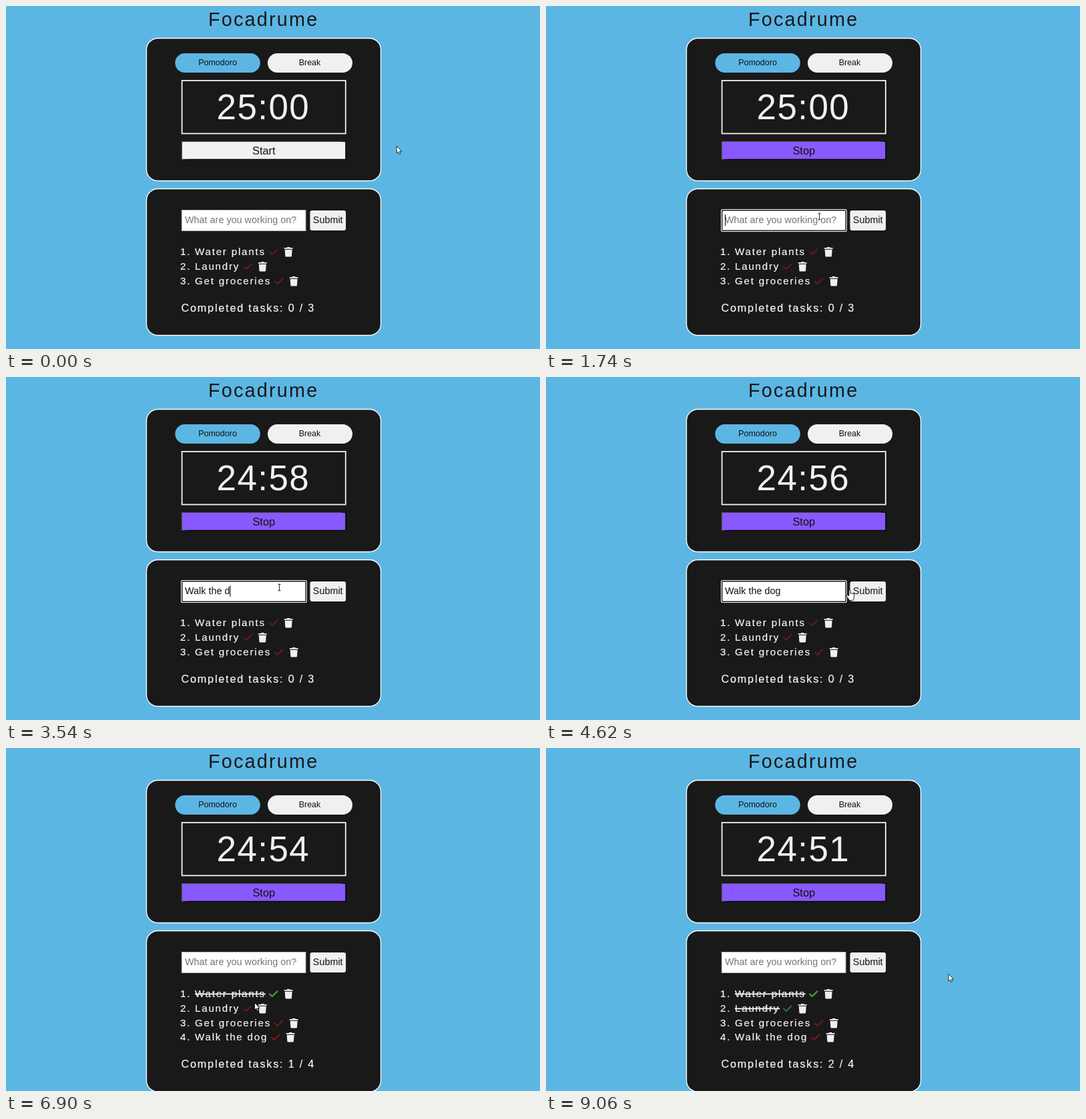
Animation, 800 px wide and 515 px high, one loop 9.3 s. Source, as an HTML page:

```html
<!DOCTYPE html>
<html lang="en">
<head>
<meta charset="utf-8">
<title>Focadrume</title>
<style>
  html, body { margin: 0; width: 100%; height: 100%; overflow: hidden; background: #5cb6e4; }
  svg { display: block; width: 100vw; height: 100vh; font-family: "Liberation Sans", Arial, sans-serif; }
  text { white-space: pre; }
  .mid { text-anchor: middle; fill: #111; }
  .card { fill: #191919; stroke: #fff; stroke-width: 1.3; }
  .light { fill: #f0f0f0; }
  .task, #total { fill: #f8f8f8; stroke: #f8f8f8; stroke-width: .2; letter-spacing: 1.8px; }
  .task { font-size: 15.1px; }
  .field { font-size: 14.4px; }
  .check { fill: none; stroke-width: 2.1; stroke-linecap: round; stroke-linejoin: round; }
  .cursor { fill: #fff; stroke: #000; stroke-width: .8; stroke-linejoin: round; }
</style>
</head>
<body>
<svg viewBox="0 0 800 515">
  <rect width="800" height="515" fill="#5cb6e4"/>
  <text x="303" y="30" font-size="28.8" letter-spacing="2.2" fill="#191919">Focadrume</text>

  <rect class="card" x="210.5" y="48.5" width="351" height="214" rx="17"/>
  <rect x="253.3" y="71" width="127.5" height="29" rx="14.5" fill="#5cb6e4"/>
  <rect class="light" x="392" y="71" width="127" height="29" rx="14.5"/>
  <g class="mid" font-size="12.5">
    <text x="317" y="89">Pomodoro</text>
    <text x="455" y="89">Break</text>
  </g>
  <rect x="263.6" y="112" width="245.2" height="79.5" fill="none" stroke="#f8f2ec" stroke-width="1.8"/>
  <text id="clock" class="light" x="315.5" y="170" font-size="53" letter-spacing="1.4"></text>
  <path d="M262.7 231V203H509.7Z" fill="#4c4c4c"/>
  <path d="M262.7 231H509.7V203Z"/>
  <rect id="toggle" x="264" y="204" width="244.3" height="25.7"/>
  <text id="toggleText" class="mid" x="386.3" y="223" font-size="16.4"></text>

  <rect id="list" class="card" x="210.5" y="274.5" width="351" rx="17"/>
  <rect x="263.3" y="306.5" width="185.7" height="31" fill="#fff" stroke="#bbb"/>
  <g id="focus">
    <rect x="262" y="305" width="188.8" height="34" rx="2.5" fill="#fff"/>
    <rect x="263.7" y="306.7" width="185.4" height="30.6" rx="1" fill="#fff" stroke="#191919" stroke-width="1.4"/>
  </g>
  <text id="field" class="field" x="268" y="326"></text>
  <rect id="caret" y="313" width="1" height="17"/>
  <rect class="light" x="455.5" y="307" width="53.6" height="30" rx="3"/>
  <text class="mid field" x="482.2" y="326">Submit</text>
  <g id="tasks"></g>
  <text id="total" x="262.5" font-size="16.2"></text>

  <g id="cursor">
    <path id="arrow" class="cursor" d="M.3 .3V11.2L2.7 8.9 4.3 12.6 6 11.8 4.5 8.3H7.8Z"/>
    <path id="hand" class="cursor" d="M-1.2 8.8V1a1.1 1.1 0 0 1 2.2 0V5.4a1 1 0 0 1 1.9.2 1 1 0 0 1 1.9.4.9.9 0 0 1 1.7.5V10.5c0 2-1.4 3-1.4 5.2H-.8C-.8 13.8-4.4 11-4.8 8.8c-.2-1 1-1.6 1.9-.8Z"/>
    <path id="beam" d="M-2 -4.8H2M-2 4.8H2M0 -4.8V4.8" fill="none" stroke="#222" stroke-width="1"/>
  </g>
</svg>
<script>
const LOOP = 9300, STEP = 60;
const START = 960, FOCUS = 1740, SUBMIT = 5100, BLINK = 480;
const ENTRY = "Walk the dog";
const keys = [...ENTRY].map((c, i) => i < 10 ? 2700 + i * 93.3 : 3060 + i * 60);

const tasks = [
  { name: "Water plants", icon: 393.8, done: 6360, red: "#601d17", green: "#45a63f" },
  { name: "Laundry", icon: 354.9, done: 7440, red: "#601d17", green: "#2f7030" },
  { name: "Get groceries", icon: 401.8, red: "#6c1c16" },
  { name: ENTRY, icon: 396.8, from: SUBMIT, red: "#841513" }
];

// Each move: begin, end, target point
const home = [585, 210];
const moves = [
  [180, 660, 476, 214],
  [1200, 1740, 409.5, 316],
  [4380, 4740, 471, 321],
  [5400, 6000, 397, 368],
  [6660, 7050, 360, 389],
  [7800, 8460, 602.7, 339]
];

// Areas that show the hand: left, top, right, bottom
const links = [
  [253, 71, 519, 100], [263, 203, 509, 231], [455, 307, 509, 337],
  [394, 363, 408, 376], [355, 384, 369, 397]
];
const input = [263, 306, 450, 338];

const $ = id => document.getElementById(id);
const show = (el, on) => el.setAttribute("visibility", on ? "visible" : "hidden");
const inside = (x, y, [l, t, r, b]) => x >= l && x <= r && y >= t && y <= b;

$("tasks").innerHTML = tasks.map(({ name, icon }, i) => {
  const y = Math.round(374.3 + i * 21.67);
  return `<g>
    <text class="task" x="261" y="${y}">${i + 1}.</text>
    <text class="task" x="283" y="${y}">${name}</text>
    <path class="check" transform="translate(${icon} ${y - 10})" d="M1.2 5.4L4.9 9 12.6 1.4"/>
    <path class="light" transform="translate(${icon + 23} ${y - 12})"
      d="M0 1H3.8L4.4 0H8.4L9 1H12.8V2.8H0ZM.9 3.7H11.9L11.2 13.2Q11.1 14.4 10 14.4H2.8Q1.7 14.4 1.6 13.2Z"/>
  </g>`;
}).join("");
const rows = [...$("tasks").children];

function cursorAt(t) {
  let [x, y] = home;
  for (const [a, b, tx, ty] of moves) {
    const u = Math.min(1, Math.max(0, (t - a) / (b - a)));
    const s = u * u * (3 - 2 * u);
    x += (tx - x) * s;
    y += (ty - y) * s;
  }
  return [x, y];
}

function drawClock(t) {
  const running = t >= START;
  const left = 1500 - (running ? Math.floor((t - START) / 900) : 0);
  $("clock").textContent = `${Math.floor(left / 60)}:${String(left % 60).padStart(2, "0")}`;
  $("toggle").setAttribute("fill", running ? "#8859ff" : "#f0f0f0");
  $("toggleText").textContent = running ? "Stop" : "Start";
}

function drawField(t) {
  const focused = t >= FOCUS && t < SUBMIT;
  const typed = focused ? keys.filter(k => k <= t).length : 0;
  const last = typed ? keys[typed - 1] : FOCUS;
  const field = $("field");
  field.textContent = typed ? ENTRY.slice(0, typed) : "What are you working on?";
  field.setAttribute("fill", typed ? "#111" : "#757575");
  show($("focus"), focused);
  show($("caret"), focused && Math.floor((t - last) / BLINK) % 2 === 0);
  $("caret").setAttribute("x", 268 + (typed ? field.getComputedTextLength() : 0));
}

function drawTasks(t) {
  let count = 0, done = 0;
  tasks.forEach((task, i) => {
    const here = t >= (task.from || 0), ticked = t >= task.done;
    count += here;
    done += ticked;
    show(rows[i], here);
    rows[i].children[1].setAttribute("text-decoration", ticked ? "line-through" : "none");
    rows[i].children[2].setAttribute("stroke", ticked ? task.green : task.red);
  });
  const grow = (count - 3) * 21.67;
  $("list").setAttribute("height", 220 + grow);
  $("total").setAttribute("y", Math.round(458.6 + grow));
  $("total").textContent = `Completed tasks: ${done} / ${count}`;
}

function drawCursor(t) {
  const [x, y] = cursorAt(t);
  const kind = inside(x, y, input) ? "beam" : links.some(a => inside(x, y, a)) ? "hand" : "arrow";
  for (const id of ["arrow", "hand", "beam"]) show($(id), id === kind);
  $("cursor").setAttribute("transform", `translate(${x.toFixed(1)} ${y.toFixed(1)})`);
}

function draw(ms) {
  const t = Math.floor(ms % LOOP / STEP) * STEP;
  drawClock(t);
  drawField(t);
  drawTasks(t);
  drawCursor(t);
}

const begin = performance.now();
function tick() {
  draw(performance.now() - begin);
  requestAnimationFrame(tick);
}
tick();
</script>
</body>
</html>
```
